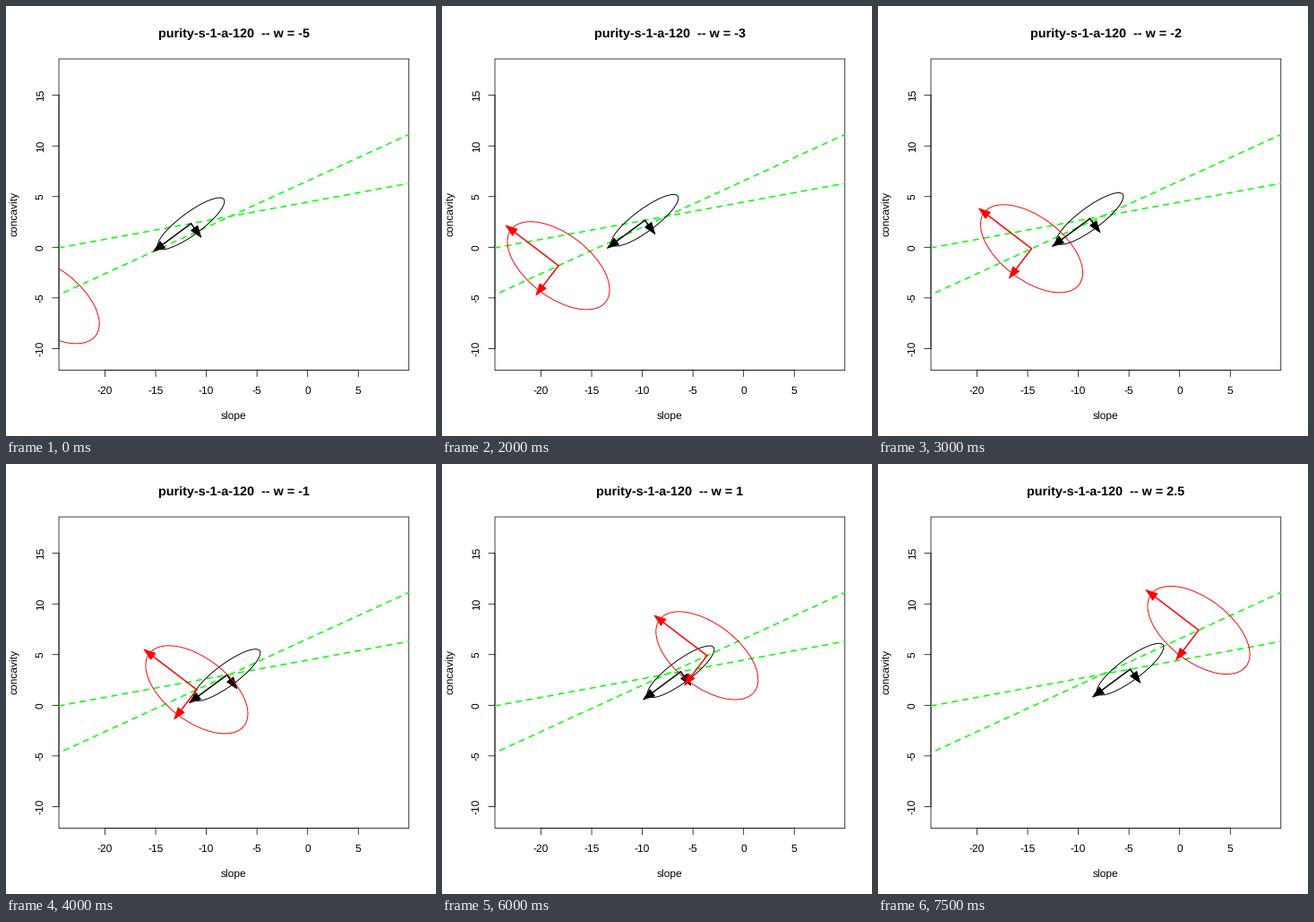
A matplotlib script for the animation above (8 s loop, 480 px wide and 480 px high).

```python
import numpy as np
import matplotlib.pyplot as plt
from matplotlib.animation import FuncAnimation
from matplotlib.patches import Ellipse, Polygon, Rectangle

plt.rcParams["font.family"] = "Liberation Sans"
plt.rcParams["text.hinting"] = "none"
plt.rcParams["path.snap"] = False

SIZE, DPI = 480, 72  # at 72 dpi one point is one pixel
LEFT, RIGHT, TOP, BOTTOM = 59.04, 449.76, 59.04, 406.56
MID_X, MID_Y = 254.4, 232.8
UNIT = 11.31         # pixels per data unit
X0, Y0 = 336.7, 269.3
THIN, BOLD = 0.75, 1.5
STEPS = np.arange(-5, 3, 0.5)

fig = plt.figure(figsize=(SIZE / DPI, SIZE / DPI), dpi=DPI, facecolor="white")
ax = fig.add_axes([0, 0, 1, 1])
ax.set_xlim(0, SIZE)
ax.set_ylim(SIZE, 0)
ax.axis("off")


def line(x, y, **style):
    style = {"color": "black", "lw": THIN, "solid_capstyle": "round", **style}
    return ax.plot(x, y, **style)[0]


def label(x, y, text, size=12, **style):
    return ax.text(x, y, text, fontsize=size, ha="center", va="baseline",
                   rotation_mode="anchor", **style)


def draw_axes():
    ax.add_patch(Rectangle((LEFT, TOP), RIGHT - LEFT, BOTTOM - TOP,
                           fill=False, ec="black", lw=THIN))
    for v in range(-20, 6, 5):
        x = X0 + UNIT * v
        line([x, x], [BOTTOM, BOTTOM + 7.2])
        label(x, 433, str(v))
    for v in range(-10, 16, 5):
        y = Y0 - UNIT * v
        line([LEFT, LEFT - 7.2], [y, y])
        label(41.8, y, str(v), rotation=90)
    line([X0 - 20 * UNIT, X0 + 5 * UNIT], [BOTTOM, BOTTOM])
    line([LEFT, LEFT], [Y0 + 10 * UNIT, Y0 - 15 * UNIT])
    label(MID_X, 462, "slope")
    label(13.5, MID_Y - 0.8, "concavity", rotation=90)


# arrowhead pointing along +x with its tip at the origin
HEAD = np.array([[0, 0], [-13, 4.5], [-13, -4.5]])


class Arrow:
    def __init__(self, color, degrees, length, clip, z):
        a = np.radians(degrees)
        self.u = np.array([np.cos(a), np.sin(a)])
        self.length = length
        self.shape = HEAD @ np.array([self.u, [-self.u[1], self.u[0]]])
        self.shaft = line([], [], color=color, lw=BOLD, zorder=z)
        self.head = Polygon(self.shape, fc=color, ec=color, lw=THIN,
                            joinstyle="round", zorder=z)
        ax.add_patch(self.head)
        for part in (self.shaft, self.head):
            part.set_clip_path(clip)

    def move(self, start):
        tip = start + self.u * self.length
        end = tip - self.u * 6
        self.shaft.set_data([start[0], end[0]], [start[1], end[1]])
        self.head.set_xy(self.shape + tip)


class Blob:
    """Ellipse with two axis arrows whose centre slides along a line."""

    def __init__(self, color, origin, step, axes, angle, reach, clip, z):
        self.origin, self.step = np.array(origin), np.array(step)
        self.ring = Ellipse((0, 0), 2 * axes[0], 2 * axes[1], angle=angle,
                            fill=False, ec=color, lw=0.95, zorder=z)
        ax.add_patch(self.ring)
        self.ring.set_clip_path(clip)
        self.arrows = [Arrow(color, angle - 90 * i, r, clip, z + 1)
                       for i, r in enumerate(reach)]

    def move(self, w):
        center = self.origin + w * self.step
        self.ring.set_center(center)
        for arrow in self.arrows:
            arrow.move(center)


draw_axes()
clip = Rectangle((LEFT, TOP), RIGHT - LEFT, BOTTOM - TOP,
                 transform=ax.transData)

for y_left, y_right, phase in [(322.4, 143.4, 4), (270, 198, 0)]:
    guide = line([LEFT, RIGHT], [y_left, y_right], color="#00ff00", lw=BOLD,
                 ls=(phase, (4, 4)), dash_capstyle="round", zorder=3)
    guide.set_clip_path(clip)

blobs = [
    Blob("black", (256.5, 233.7), (10.0, -1.84), (45.6, 12.3), 143.5,
         (52.4, 19.2), clip, 4),
    Blob("red", (254.4, 232.9), (41.45, -18.97), (66.5, 35.2), 217.3,
         (74.2, 41.6), clip, 6),
]
title = label(MID_X, 35, "", size=14.4, weight="bold")


def update(i):
    w = STEPS[i]
    title.set_text(f"purity-s-1-a-120  -- w = {w:g}")
    for blob in blobs:
        blob.move(w)
    return []


anim = FuncAnimation(fig, update, frames=len(STEPS), interval=500,
                     repeat=True, repeat_delay=0)
plt.show()
```
